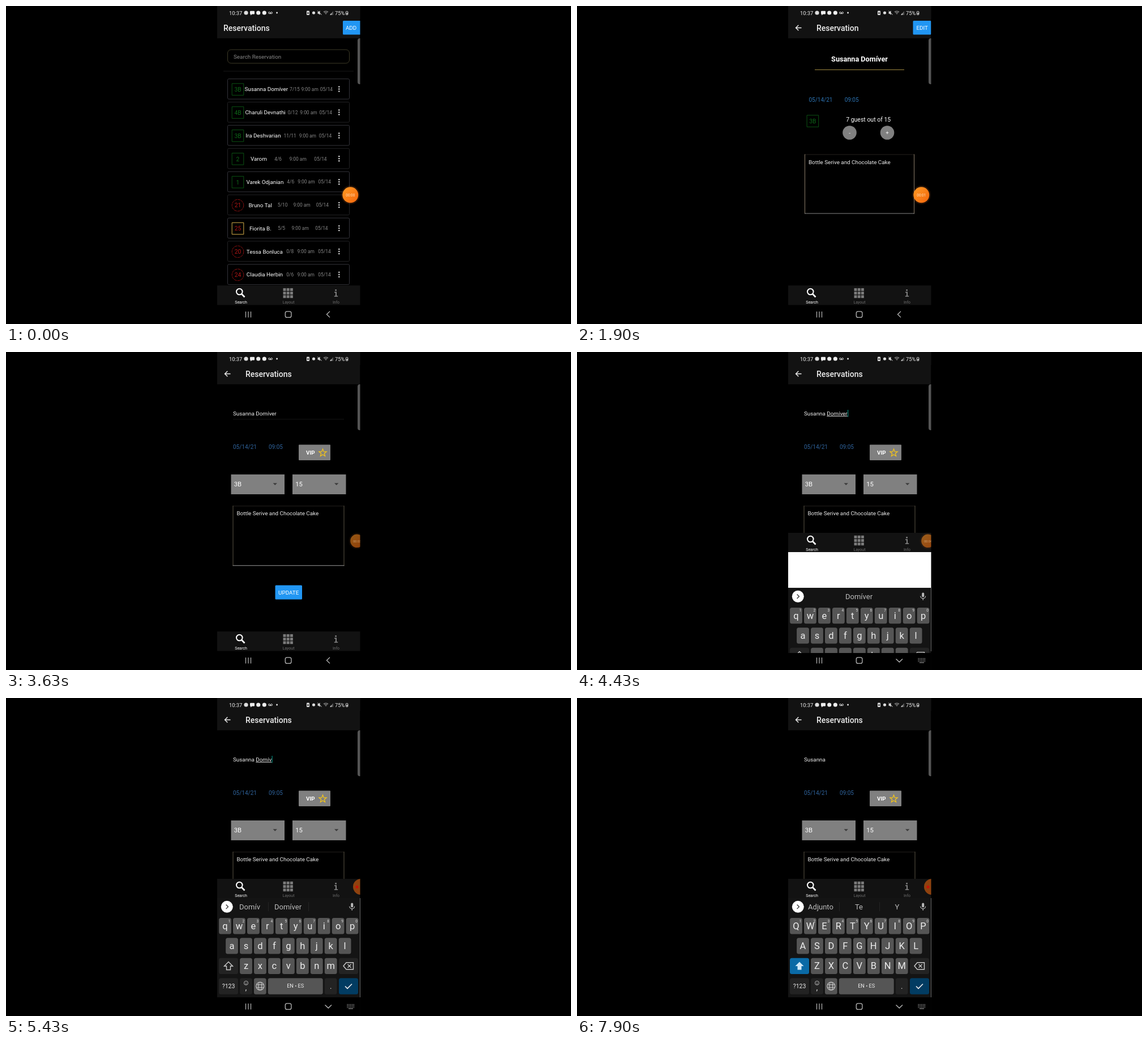
Write an HTML page with a canvas that moves like this. It is 998 px wide and 561 px high and loops after 8000 ms.

```html
<!DOCTYPE html>
<html lang="en">
<head>
<meta charset="utf-8">
<title>Reservations</title>
<style>
  html, body { margin: 0; width: 100%; height: 100%; overflow: hidden; background: #000; }
  canvas { display: block; }
</style>
</head>
<body>
<canvas id="stage" width="998" height="561"></canvas>
<script>
const ctx = document.getElementById('stage').getContext('2d');
const LOOP = 8000, LEFT = 373, RIGHT = 625.5, MID = 499;
const BAR = '#121212', GRAY = '#808080', BLUE = '#2196f3';
const GREEN = '#0d6a18', RED = '#b01616', GOLD = '#d9b04a';
const FIRST = 'Susanna', LAST = 'Domíver', NOTE = 'Bottle Serive and Chocolate Cake';

const GUESTS = [
  ['3B', FIRST + ' ' + LAST, '7/15'], ['4B', 'Charuli Devnathi', '0/12'],
  ['3B', 'Ira Deshvarian', '11/11'], ['2', 'Varom', '4/6'],
  ['1', 'Varek Odjanian', '4/6'], ['21', 'Bruno Tal', '5/10'],
  ['25', 'Fiorita B.', '5/5'], ['20', 'Tessa Bonluca', '0/8'], ['24', 'Claudia Herbin', '0/6']
];

const OPEN_DETAIL = 1380, OPEN_EDIT = 3110, MOVE = 400;
const PRESS_EDIT = 3000, FOCUS = 4270, KEYBOARD = 4300;
const DELETES = [5130, 5400, 5770, 5980, 6560, 6800, 7330];

const clamp = v => Math.max(0, Math.min(1, v));
const progress = (t, start, length) => clamp((t - start) / length);
const smooth = u => u * u * (3 - 2 * u);

// ---- drawing helpers ----
function font(size, weight = 400) { ctx.font = `${weight} ${size}px Roboto, sans-serif`; }
function text(s, x, y, size, color = '#fff', align = 'left', weight = 400) {
  font(size, weight);
  ctx.fillStyle = color;
  ctx.textAlign = align;
  ctx.fillText(s, x, y);
}
function rect(x, y, w, h, color, r = 0) {
  ctx.fillStyle = color;
  ctx.beginPath();
  ctx.roundRect(x, y, w, h, r);
  ctx.fill();
}
function frame(x, y, w, h, color, r = 0, width = 1) {
  ctx.strokeStyle = color;
  ctx.lineWidth = width;
  ctx.beginPath();
  ctx.roundRect(x, y, w, h, r);
  ctx.stroke();
}
function disc(x, y, r, color) {
  ctx.fillStyle = color;
  ctx.beginPath();
  ctx.arc(x, y, r, 0, 7);
  ctx.fill();
}
function ring(x, y, r, color, width = 1) {
  ctx.strokeStyle = color;
  ctx.lineWidth = width;
  ctx.beginPath();
  ctx.arc(x, y, r, 0, 7);
  ctx.stroke();
}
function path(points, color, width = 0, close = false) {
  ctx.beginPath();
  points.forEach(([x, y]) => ctx.lineTo(x, y));
  if (close) ctx.closePath();
  if (width) { ctx.strokeStyle = color; ctx.lineWidth = width; ctx.stroke(); }
  else { ctx.fillStyle = color; ctx.fill(); }
}
function clipped(x, y, w, h, draw) {
  ctx.save();
  ctx.beginPath();
  ctx.rect(x, y, w, h);
  ctx.clip();
  draw();
  ctx.restore();
}

// ---- app screens ----
function header(title, back, button, color = BLUE) {
  rect(LEFT, 0, RIGHT - LEFT, 57, BAR);
  text(title, back ? 423 : 384, 44, 14, '#eee', 'left', 500);
  if (back) {
    path([[396.5, 38.5], [386.5, 38.5]], '#eee', 1.4);
    path([[391.3, 33.7], [386.5, 38.5], [391.3, 43.3]], '#eee', 1.4);
  }
  if (button) {
    rect(back ? 593.5 : 595, 26, 32, 24.5, color, 1.5);
    text(button, 609.6, 42.2, 9.84, '#fff', 'center');
  }
}

function badge(label, x, y) {
  const round = ['20', '21', '24'].includes(label), vip = label === '25';
  if (round) {
    ctx.setLineDash([5, 1]);
    ring(x, y, 10.3, '#8c1212');
    ctx.setLineDash([]);
  } else frame(x - 10.3, y - 10.3, 20.6, 20.6, vip ? GOLD : '#0b5213');
  text(label, x, y + 3.8, 10.3, round || vip ? RED : GREEN, 'center');
}

function guestRow([label, name, count], i) {
  const y = 146.6 + 40.9 * i;
  frame(391.5, y - 18, 215, 35.6, i % 2 ? '#222224' : '#34343a', 2);
  badge(label, 409.5, y + .5);
  const cells = [[name, 9.84, '#fff'], [count, 8.44, '#858585'], ['9:00 am', 8.44, '#858585'], ['05/14', 8.44, '#858585']];
  const widths = cells.map(([s, size]) => { font(size); return ctx.measureText(s).width; });
  const gap = (161.5 - widths.reduce((a, b) => a + b)) / 5;
  let x = 418.5 + gap;
  cells.forEach(([s, size, color], k) => {
    text(s, x, y + 3.6 - (k ? .4 : 0), size, color);
    x += widths[k] + gap;
  });
  for (const dy of [-4, 0, 4]) disc(588.3, y + dy, 1.25, '#ddd');
}

function listScreen() {
  header('Reservations', false, 'ADD');
  frame(391.5, 77, 215, 24, '#3d3a26', 6);
  text('Search Reservation', 402, 92.6, 9.84, '#888');
  rect(384, 114.5, 230, 1, '#181818');
  GUESTS.forEach(guestRow);
}

function noteBox(x, y, w, h, side, bottom) {
  rect(x, y, w, 1, '#24211d');
  rect(x, y, 1, h, side);
  rect(x + w - 1, y, 1, h, side);
  rect(x, y + h - 1, w, 1, bottom);
  text(NOTE, x + 7, y + 17, 9.84, '#eee');
}

function detailScreen(t) {
  header('Reservation', true, 'EDIT', t > PRESS_EDIT ? '#1f80d4' : BLUE);
  text(FIRST + ' ' + LAST, MID, 98.2, 12.65, '#fff', 'center', 700);
  rect(420, 112, 158, 1, '#a08a40');
  text('05/14/21', 409.5, 169, 10, '#2c73b2');
  text('09:05', 472.7, 169, 10, '#2c73b2');
  badge('3B', 416.4, 203);
  text('7 guest out of 15', 514.7, 204.2, 10.5, '#fff', 'center');
  for (const [x, sign] of [[481.5, '-'], [548, '+']]) {
    disc(x, 223.5, 12.3, GRAY);
    text(sign, x, 226.8, 9.84, '#fff', 'center');
  }
  noteBox(402, 261.5, 194, 105, '#8a7c68', '#858585');
}

function typedName(t) {
  const gone = DELETES.filter(d => t >= d).length;
  return LAST.slice(0, LAST.length - gone);
}

function nameField(t) {
  const word = typedName(t), start = FIRST + ' ';
  text(start + word, 401, 111.5, 9.84, '#eee');
  const from = 401 + ctx.measureText(start).width;
  const end = from + ctx.measureText(word).width;
  if (t < FOCUS) { rect(401, 118, 196, 1, '#141414'); return; }
  if (word) rect(from, 112.8, end - from, 1, '#ddd');
  const lastEdit = [FOCUS, ...DELETES].filter(d => t >= d).pop();
  if ((t - lastEdit) % 1000 < 500) rect(end + .3, 102, 1.2, 12.5, '#00897b');
}

function star(x, y, r) {
  const points = Array.from({ length: 10 }, (_, i) => {
    const a = i * Math.PI / 5, d = i % 2 ? r * .42 : r;
    return [x + d * Math.sin(a), y - d * Math.cos(a)];
  });
  path(points, '#f5c518', 1.2, true);
}

function editScreen(t) {
  header('Reservations', true);
  nameField(t);
  text('05/14/21', 401, 171, 10, '#2f639c');
  text('09:05', 464, 171, 10, '#2f639c');
  rect(517, 163.5, 56, 27.5, GRAY, 1);
  text('VIP', 530, 181.2, 9.84, '#fff', 'left', 700);
  star(559.5, 178, 7);
  for (const [x, value] of [[397.5, '3B'], [506, '15']]) {
    rect(x, 216, 94.5, 35, GRAY);
    text(value, x + 5.3, 237.4, 11.25);
    path([[x + 74, 231.3], [x + 81.4, 231.3], [x + 77.7, 235]], '#3c3c3c');
  }
  noteBox(400.5, 271.3, 197, 106, '#5a5344', '#9a9a9a');
  rect(475.5, 411.5, 47.5, 25, BLUE, 1.5);
  text('UPDATE', 499.2, 427.8, 9.84, '#fff', 'center');
}

function scaled(scale, alpha, bottom, draw) {
  clipped(LEFT, 0, RIGHT - LEFT, bottom, () => {
    ctx.translate(MID, 246);
    ctx.scale(scale, scale);
    ctx.translate(-MID, -246);
    ctx.globalAlpha = alpha;
    rect(LEFT, 0, RIGHT - LEFT, 493, '#000');
    draw();
  });
}

function screens(t, bottom) {
  const stack = [listScreen, () => detailScreen(t), () => editScreen(t)];
  const shown = [1, smooth(progress(t, OPEN_DETAIL, MOVE)), smooth(progress(t, OPEN_EDIT, MOVE)), 0];
  stack.forEach((draw, i) => {
    if (shown[i] === 0 || shown[i + 1] === 1) return;
    scaled(.85 + .15 * shown[i] + .1 * shown[i + 1], clamp((shown[i] - .25) * 2), bottom, draw);
  });
}

// ---- bars ----
function statusBar() {
  rect(LEFT, 0, RIGHT - LEFT, 23, BAR);
  text('10:37', 394, 16, 9.4, '#eee');
  disc(424, 12, 3.6, '#ddd');
  rect(431, 8.8, 8, 5.8, '#eee', 1);
  path([[432, 14], [432, 16.5], [435, 14]], '#eee');
  disc(445.7, 12, 3.6, '#eee');
  disc(456.3, 12, 3.6, '#eee');
  ring(465, 12, 1.5, '#ccc');
  ring(469, 12, 1.5, '#ccc');
  rect(465, 13, 4, 1, '#ccc');
  disc(478.6, 12, 1.4, '#eee');
  rect(531, 8.5, 5, 7.5, '#ddd', 1);
  rect(532.5, 11, 2, 3, '#222');
  disc(543.5, 12, 2.6, '#ddd');
  path([[550.5, 10.5], [552, 10.5], [554.5, 8.3], [554.5, 15.7], [552, 13.5], [550.5, 13.5]], '#ddd');
  path([[550.5, 8.5], [557.5, 15.5]], '#ddd', 1);
  for (const r of [1.5, 3.8, 6]) {
    ctx.strokeStyle = '#aaa';
    ctx.lineWidth = 1.1;
    ctx.beginPath();
    ctx.arc(565, 15, r, -2.3, -.85);
    ctx.stroke();
  }
  path([[572, 15.7], [578, 15.7], [578, 9]], '#5c5c5c');
  path([[572, 15.7], [575, 15.7], [575, 12.3]], '#ccc');
  text('75%', 581, 16, 9.3, '#eee');
  frame(600.3, 9.5, 3.6, 6, '#ddd', 1);
  rect(601.5, 12, 2, 2.5, '#ddd');
}

function tabBar(y) {
  rect(LEFT, y, RIGHT - LEFT, 34.5, BAR);
  ring(412.3, y + 11, 5.3, '#fff', 2);
  path([[416.2, y + 15], [421.5, y + 20.5]], '#fff', 2.6);
  for (let i = 0; i < 9; i++) rect(489.5 + i % 3 * 6.2, y + 4.8 + (i / 3 | 0) * 6.2, 5, 5, '#7a7a7a');
  rect(581.3, y + 7, 2.6, 2.6, GRAY);
  rect(580, y + 11.3, 4, 1.6, GRAY);
  rect(582, y + 11.3, 2, 8, GRAY);
  rect(579.8, y + 18.2, 6.4, 1.6, GRAY);
  text('Search', 415, y + 32, 7.03, '#fff', 'center');
  text('Layout', MID, y + 32, 7.03, '#6c6c6c', 'center');
  text('Info', 583, y + 32, 7.03, '#6c6c6c', 'center');
}

function navBar(typing) {
  rect(LEFT, 528, RIGHT - LEFT, 33, '#000');
  for (const x of [423.5, 428, 432.5]) rect(x - .6, 539, 1.2, 10.5, '#bbb');
  frame(493.3, 538.8, 10.6, 10.6, '#bbb', 3, 1.3);
  if (!typing) { path([[572, 538.6], [566.5, 544], [572, 549.4]], '#bbb', 1.3); return; }
  path([[563.5, 541.5], [569.3, 547], [575, 541.5]], '#bbb', 1.3);
  for (let i = 0; i < 15; i++) rect(602.5 + i % 5 * 2.8, 540 + (i / 5 | 0) * 2.6, 1.3, 1.3, '#aaa');
  rect(605, 547.5, 8, 1, '#aaa');
}

function edgeHandle() {
  rect(621, 57, 4.5, 81, '#555', [4, 0, 0, 4]);
}

function recorder(t) {
  clipped(LEFT, 300, RIGHT - LEFT, 70, () => {
    if (t > 5200) {
      disc(627, 333, 14, '#8f420f');
      disc(620, 333.3, 2.6, '#c41408');
      return;
    }
    const away = smooth(progress(t, 2000, 170)), x = 608.3 + 11.7 * away, r = 14 - 2.2 * away;
    ctx.globalAlpha = 1 - .45 * away;
    disc(x, 333.3, r + 2.5, 'rgba(120,60,20,.3)');
    const fill = ctx.createLinearGradient(x - r, 320, x + r, 347);
    fill.addColorStop(0, '#ff9a24');
    fill.addColorStop(1, '#f5660c');
    disc(x, 333.3, r, fill);
    const seconds = Math.max(0, Math.floor((t - 130) / 1000));
    text('00:0' + seconds, x, 335.6, 6.4 - away, '#ffe0c0', 'center');
  });
}

// ---- keyboard ----
function key(x, y, w, label, color = '#555', size = 16.5) {
  rect(x - w / 2, y - 14, w, 28.4, color, 3.5);
  text(label, x, y + size * .34, size, '#eee', 'center');
}

function ramPictures(y) {
  rect(543.5, y - 7, 14, 14, '#8a2be2', 2);
  ctx.strokeStyle = '#fff';
  ctx.lineWidth = 1.4;
  ctx.beginPath();
  ctx.arc(548.2, y - 1.5, 2.3, Math.PI, 0);
  ctx.lineTo(550.5, y + 4.5);
  ctx.lineTo(550.5, y - 1.5);
  ctx.arc(552.8, y - 1.5, 2.3, Math.PI, 0);
  ctx.stroke();
  for (const x of [579.5, 586]) rect(x, y + 2, 1.6, 5, '#b89a78');
  rect(577, y - 3, 12, 7, '#e6dccb', 3.5);
  disc(578, y - 3, 3, '#d8c4a4');
  ring(579, y - 3.8, 1.7, '#8a6a48', 1.2);
}

function suggestions(word, y) {
  if (word === LAST) { text(word, 498, y + 4.6, 13, '#bbb', 'center'); return; }
  const known = {
    '': ['Adjunto', 'Te', 'Y'], D: ['D', 'De', 'Dos'], Do: ['Do', 'Don', 'Dos'], Dom: ['Dom', 'DOM', '']
  };
  const words = known[word] || [word, LAST, ''];
  words.forEach((s, i) => text(s, 430.5 + 67.5 * i, y + 4.6, 13, '#bbb', 'center'));
  for (const x of [463, 534]) rect(x, y - 8, 1, 16, '#242424');
  if (word === 'Dom') ramPictures(y);
}

function keyboard(t) {
  const word = typedName(t), upper = !word;
  rect(LEFT, 353, RIGHT - LEFT, 208, '#141414');

  disc(390.3, 368.3, 10.5, '#fff');
  path([[388.6, 364.5], [392.4, 368.3], [388.6, 372.1]], '#333', 1.3);
  suggestions(word, 368.3);
  rect(609.2, 361.5, 4, 8, '#bbb', 2);
  ctx.strokeStyle = '#bbb';
  ctx.lineWidth = 1.2;
  ctx.beginPath();
  ctx.arc(611.2, 367.5, 4.4, 0, Math.PI);
  ctx.stroke();
  rect(610.6, 372, 1.2, 3, '#bbb');

  [['qwertyuiop', 387, 402], ['asdfghjkl', 399, 437.2], ['zxcvbnm', 424, 472.7]].forEach(([letters, x0, y], row) => {
    [...letters].forEach((letter, i) => {
      const x = x0 + 24.95 * i;
      key(x, y, 21.8, upper ? letter.toUpperCase() : letter);
      if (!row) text((i + 1) % 10, x + 7.5, y - 6.5, 6.5, '#ddd', 'center');
    });
  });

  key(393, 472.7, 34, '', upper ? '#0a6aa6' : '#232323');
  path([[393, 465.5], [400.5, 473], [396.5, 473], [396.5, 479.5], [389.5, 479.5], [389.5, 473], [385.5, 473]],
    upper ? '#cfe8f8' : '#ccc', upper ? 0 : 1.4, true);
  key(605, 472.7, 34, '', '#232323');
  path([[596, 472.7], [601, 466.7], [613.5, 466.7], [613.5, 478.7], [601, 478.7]], '#ccc', 1.4, true);
  path([[603.5, 469.8], [609.5, 475.8]], '#ccc', 1.3);
  path([[609.5, 469.8], [603.5, 475.8]], '#ccc', 1.3);

  const y = 508.3;
  key(393, y, 34, '?123', '#232323', 10.5);
  key(424, y, 21.8, '', '#232323');
  ring(424, y - 5.5, 3.6, '#bbb', .9);
  disc(422.8, y - 6.3, .6, '#bbb');
  disc(425.2, y - 6.3, .6, '#bbb');
  rect(422.4, y - 4.4, 3.2, .8, '#bbb');
  text(',', 424, y + 8, 14, '#ddd', 'center');
  key(448.8, y, 21.8, '');
  ring(448.8, y, 7, '#ccc', 1.1);
  ctx.beginPath();
  ctx.ellipse(448.8, y, 3, 7, 0, 0, 7);
  ctx.stroke();
  for (const dy of [-2.5, 2.5]) rect(442.3, y + dy - .5, 13, 1, '#ccc');
  key(511.2, y, 97, 'EN • ES', '#555', 9.2);
  key(573.6, y, 21.8, '.', '#232323', 13);
  key(605, y, 34, '', '#023c62');
  path([[599, 508.5], [603, 512.5], [611, 504.5]], '#eee', 1.6);
}

function draw(t) {
  const typing = t >= KEYBOARD;
  const tabY = typing ? 319 : 493;
  rect(0, 0, 998, 561, '#000');
  screens(t, tabY);
  statusBar();
  tabBar(tabY);
  navBar(typing);
  if (typing) {
    const drop = 207 * (1 - progress(t, KEYBOARD, 400)) ** 3;
    rect(LEFT, 353, RIGHT - LEFT, 175, '#fff');
    clipped(LEFT, 353, RIGHT - LEFT, 208, () => {
      ctx.translate(0, drop);
      keyboard(t);
    });
    clipped(LEFT, 528 + Math.min(drop, 3), RIGHT - LEFT, 33, () => navBar(true));
  }
  edgeHandle();
  recorder(t);
}

function tick() {
  draw(performance.now() % LOOP);
  requestAnimationFrame(tick);
}
tick();
</script>
</body>
</html>
```
